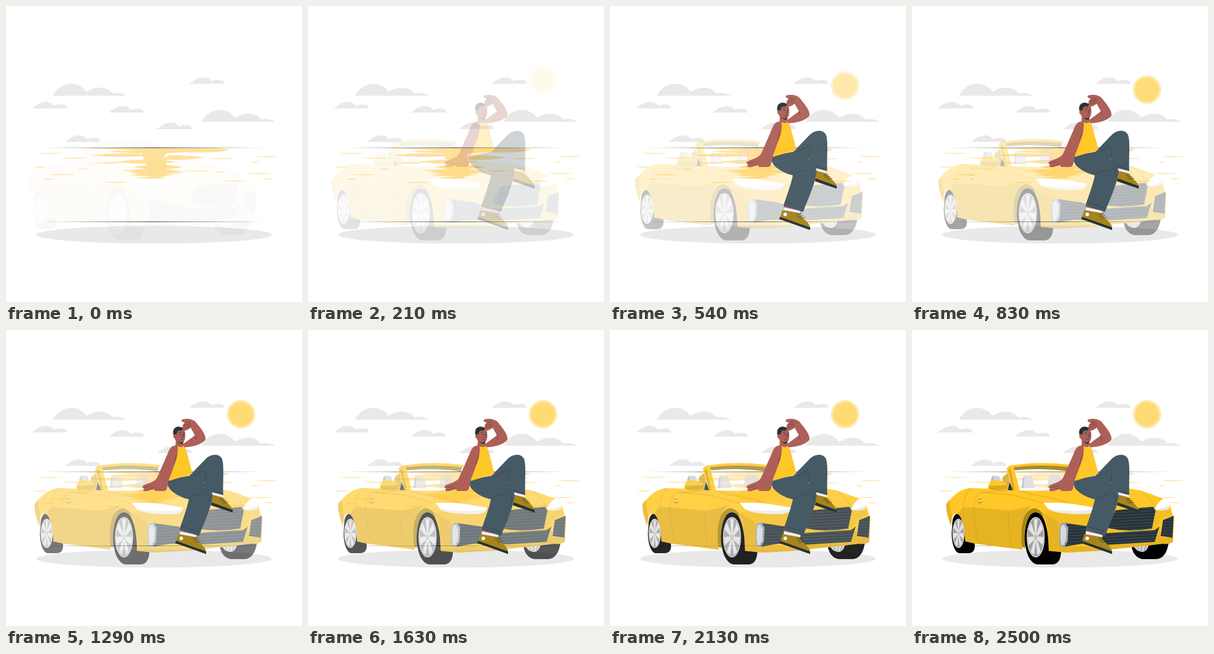
Recreate the animation shown at these times as an HTML page. Size 500x500 px, loop 2540 ms.

```html
<!DOCTYPE html>
<html lang="en">
<head>
<meta charset="utf-8">
<title>Sunset drive</title>
<style>
html, body { margin: 0; width: 100%; height: 100%; overflow: hidden; background: #fff; }
svg { display: block; width: 100vw; height: 100vh; }
.body { fill: #ffc727; }
.side { fill: #e6b323; }
.dark { fill: #263238; }
.skin { fill: #ae6058; }
.pants { fill: #455a64; }
.shoe { fill: #a6851a; }
.seam { fill: none; stroke: #263238; stroke-width: .7; stroke-linecap: round; stroke-linejoin: round; }
.crease { fill: none; stroke: #c99a18; stroke-width: .6; }
</style>
</head>
<body>
<svg viewBox="0 0 500 500">
<defs>
  <path id="big" d="M0 0C8-14 19-20 31-20C43-20 52-14 57-6.500C66-12 73-14 81-13.500C90-13 98-9 101-3.500C108-6 117-5 125 0Z"/>
  <path id="small" d="M0 0C9-8 17-11 23-11C30-11 35-8 37-4.500C43-7 50-7.500 54-6C58-5 59-3 58.500 0Z"/>
  <pattern id="mesh" width="6" height="5" patternUnits="userSpaceOnUse" patternTransform="rotate(-3)">
    <rect width="6" height="5" fill="#263238"/>
    <path d="M0 1H6" stroke="#52616a" stroke-width=".7"/>
  </pattern>
</defs>

<g id="clouds" fill="#e9e9e9"></g>
<g id="water" fill="#ffe09a"></g>
<g id="lines" fill="#37474f"></g>
<ellipse cx="250" cy="386.300" rx="199" ry="15" fill="#e9e9e9"/>

<g id="sun">
  <circle cx="397" cy="142.300" r="24" fill="#ffe9b0"/>
  <circle cx="397" cy="142.300" r="20.500" fill="#ffdb74"/>
</g>

<g id="car">
  <!-- cabin -->
  <g fill="#d3d3d3">
    <path d="M132 268L134 250Q136 246 141 246Q148 246 149 250L151 268Z"/>
    <path d="M185 267L187 250Q189 246 196 246Q203 246 204 250L208 267Z"/>
    <path d="M228 267L231 249Q233 245 241 245Q250 245 251 249L254 267Z"/>
  </g>
  <g fill="#b5b5b5">
    <path d="M132 268L134 250Q135 247 138 246Q136 256 137 268Z"/>
    <path d="M185 267L187 250Q188 247 191 246Q188 256 190 267Z"/>
  </g>
  <path d="M153 249L162 241L168 271H153Z" fill="#d9b344"/>
  <path class="dark" d="M162 271L165 257L171 271Z"/>
  <path d="M173 236Q220 229 264 238L255 270L181 269Z" fill="#fff" opacity=".3"/>
  <path d="M170 231Q218 224 268 231L265 239Q220 232 174 237Z" fill="#a58a31"/>
  <path class="body" d="M160 235Q161 230 166 229Q216 221 270 228L269 232Q217 226 172 232L182 271H170Z"/>
  <path d="M163 236L166 234L174 271H170Z" fill="#d8a71c"/>

  <!-- far wheel -->
  <path d="M370 357L434 350C434 371 426 387 412 387H390C378 386 370 374 370 357Z"/>
  <g id="rimC"></g>

  <!-- wheel wells and tyres -->
  <path d="M185 364C183 326 191 302 207 302C225 303 238 330 239 372Z" fill="#8c7220"/>
  <path d="M68 330C68 316 72 309 80 310C94 320 102 340 106 362C107 373 102 377 95 377H80C72 376 67 360 67 343Z"/>
  <path d="M190 346C190 322 197 308 208 308C224 309 240 340 252 370C252 386 248 396 236 396H212C199 395 190 374 190 346Z"/>

  <!-- shell -->
  <path class="body" d="M58 294C60 289 63 287 65 286C72 277 85 268 98 267L130 268L172 271L233 272C290 258 350 263 385 271C405 277 418 283 427 286C434 290 438 300 440 312L443 316L441 357C438 361 431 362 423 361L398 364L330 371L262 376L231 373C231 345 226 309 207 302C190 300 184 330 187 371L108 361L90 357C89 331 83 311 75 310C68 310 66 319 66 331C62 320 57 306 58 294Z"/>
  <path class="side" d="M86 299L105 300L165 305C177 303 188 300 202 297C188 306 184 338 187 371L108 361L90 357C89 333 85 317 78 310Z"/>
  <path class="side" d="M58 294L64 289C65 300 66 310 68 315L66 331C62 320 57 306 58 294Z"/>
  <path class="side" d="M222 309L248 324L250 366L291 365L334 372L262 376L231 373C231 348 228 322 222 309Z"/>
  <path class="side" d="M328 363L410 359L418 337L421 350L441 351L441 357C438 361 430 362 423 361L398 364L334 371Z"/>
  <path class="side" d="M309 301L348 303L408 298L411 303L434 303L440 312L422 318L410 338L331 342L293 333L248 324L222 309L232 306L285 312Z" opacity=".45"/>
  <path d="M186 366C182 326 190 302 207 301C216 303 222 310 224 316C214 304 204 307 199 314C192 325 189 343 191 369Z" fill="#a88719"/>
  <path class="crease" d="M98 267C91 277 87 288 87 299M104 303C103 292 107 281 116 274L160 272M104 303L110 358M162 305C163 326 165 350 168 367M116 274L172 279L222 293M182 272C202 278 235 283 265 292M385 271C398 281 408 290 411 303"/>
  <path d="M110 288Q112 284 117 285L121 288Q119 293 114 294Q110 293 110 288Z" fill="#d8a71c"/>
  <path d="M111 289L120 288" stroke="#ffe28e" stroke-width="2"/>
  <path class="body" d="M129 264C129 257 134 254 143 254C153 254 160 257 160 263C160 269 156 271 149 271C140 271 132 270 129 268Z"/>
  <path d="M129 264C139 262 150 263 160 262C160 269 156 271 149 271C140 271 132 270 129 268Z" fill="#dca91b"/>

  <!-- lights -->
  <path d="M222 292C242 290 274 293 309 300C309 307 302 311 287 311C264 311 239 309 230 302Z" fill="#fff"/>
  <path d="M230 302C250 306 280 307 308 303C306 309 299 311 287 311C264 311 239 309 230 302Z" fill="#ebebeb"/>
  <path d="M410 303C414 293 420 286 428 284C434 289 436 296 434 302C427 305 418 306 410 303Z" fill="#fff"/>
  <path d="M410 303Q423 302 434 298L434 302C427 305 418 306 410 303Z" fill="#e6e6e6"/>

  <!-- grilles -->
  <path d="M330 334L344 305L407 299L411 305L405 335Q366 342 330 334Z" fill="url(#mesh)"/>
  <path d="M330 334L344 305L407 299L411 305L405 335Q366 342 330 334Z" fill="none" stroke="#37474f"/>
  <path d="M258 326L300 332L330 343L410 338L418 332L410 358L328 363L288 361L258 366Z" fill="url(#mesh)"/>
  <path d="M424 321L442 314L440 351L420 348Z" fill="url(#mesh)"/>
  <path d="M250 327L259 325L264 334L263 357L258 366L250 366Q247 346 250 327Z" fill="#9da3a6"/>
  <path d="M252 330L257 329L261 337L260 355L255 364L252 363Q249 345 252 330Z" fill="#d7d9da"/>

  <g id="rimA"></g>
  <g id="rimB"></g>
</g>

<g id="man">
  <!-- far leg -->
  <path class="skin" d="M348 270L366 274L366 284L348 281Z"/>
  <path d="M347 273L367 278V283L347 278Z" fill="#f2f2f2"/>
  <path class="shoe" d="M349 279L366 283C371 291 382 297 383 305L347 293Z"/>
  <path class="dark" d="M347 291L383 304V308.500L346 296Z"/>
  <path class="seam" d="M361 286L369 285M363 289L372 288M366 292L375 291"/>
  <path class="pants" d="M311 245L338 217C348 208 361 209 365 218C369 230 366 255 367 279L336 271L336 257L319 266L302 254Z"/>
  <path class="seam" d="M336 257L338 237M337 268L366 276M316 247L334 237" opacity=".6"/>

  <!-- near leg -->
  <path class="skin" d="M294 337L323 342L322 351L293 346Z"/>
  <path d="M294 340L322 346L321 350L293 345Z" fill="#f2f2f2"/>
  <path class="shoe" d="M291 345L320 350C324 360 338 365 338 375L287 358Z"/>
  <path class="dark" d="M287 356L338 374V378.500L286 360Z"/>
  <circle cx="296" cy="352" r="3" fill="#fff"/>
  <path class="seam" d="M315 353L324 351M317 356L326 354M320 359L329 357"/>
  <path class="pants" d="M274 254C286 250 303 247 315 246C332 254 350 266 349 282C345 304 334 327 326 348L293 337C299 319 305 304 309 286C294 283 275 272 273 261Z"/>
  <path class="seam" d="M309 286C316 280 324 279 332 277M296 331L328 342M337 272Q346 278 344 291" opacity=".6"/>

  <!-- torso -->
  <path class="skin" d="M287 186L299 188L302 198L307 213L287 217L286 198Z"/>
  <path d="M290 196Q296 200 301 195C306 209 312 229 314.500 243L275 255C278 239 285 226 288 213Z" fill="#ffc727"/>
  <path class="skin" d="M301 198C313 198 331 194 337 185C338 176 328 165 321 156C316 150 305 149 298 151C295 153 297 156 302 156L299 160C298 163 297 167 299 171C304 170 309 168 312 165L319 178L300 192Z"/>
  <path class="seam" d="M302 156Q308 154 312 158M300 161Q306 157 312 161M300 166Q305 161 310 164M319 178Q322 182 321 185" opacity=".7"/>
  <path class="skin" d="M290 196C281 193 276 200 273 209L255 250C250 257 240 259 233 262C229 265 230 267 234 267C230 270 232 273 237 272L250 269L252 272H267C274 271 272 263 274 256L288 218Q291 204 290 196Z"/>
  <path class="seam" d="M233 267L245 263M237 272L248 266M288 211L283 228" opacity=".6"/>

  <!-- head -->
  <path class="skin" d="M284 171C286 164 299 161 302 171C304 179 303 190 296 191C289 192 285 186 284 180Z"/>
  <path class="dark" d="M286 182C281 178 281 168 286 165C290 162 296 163 299 166L297 170C291 168 288 171 288 178Z"/>
  <path class="dark" d="M289 187Q295 193 300 187L298 192Q293 193 289 187Z"/>
  <ellipse class="skin" cx="285.500" cy="179.500" rx="2.800" ry="3.600"/>
  <circle class="dark" cx="294.500" cy="176.500" r=".9"/>
  <circle class="dark" cx="300" cy="176.500" r=".9"/>
  <path class="seam" d="M292 173L296 172.500M299 173L301.500 174M298 177L299.500 181L297 181.500M295 185.500L299 185"/>
</g>
</svg>
<script>
const $ = id => document.getElementById(id);
const LOOP = 2540;

$('clouds').innerHTML =
  [[79, 151.5], [330, 195.5]].map(p => `<use href="#big" x="${p[0]}" y="${p[1]}"/>`).join('') +
  [[44, 173], [174, 180], [255, 208], [310, 131.5], [100, 229.5]]
    .map(p => `<use href="#small" x="${p[0]}" y="${p[1]}"/>`).join('');

// Spindle between x1 and x2, bulging up and down.
const lens = (x1, x2, y, up, down) => {
  const m = (x1 + x2) / 2;
  return `M${x1} ${y}Q${m} ${y - 2 * up} ${x2} ${y}Q${m} ${y + 2 * down} ${x1} ${y}Z`;
};
const star = (x, y, r) =>
  `<path fill="#fff" d="M${x} ${y - r}L${x + 1} ${y - 1}L${x + r} ${y}L${x + 1} ${y + 1}L${x} ${y + r}L${x - 1} ${y + 1}L${x - r} ${y}L${x - 1} ${y - 1}Z"/>`;

const glints = [[143, 252, 252, 3], [232, 336, 256, 4], [185, 290, 263, 3.5], [215, 299, 272, 4],
  [193, 300, 278, 2.5], [205, 302, 281, 3], [208, 286, 285, 2.5], [218, 272, 290, 1.5], [146, 200, 265, 1]];
const ripples = [[51, 97, 248.5], [91, 140, 256.5], [44, 70, 271.5], [119, 141, 275], [70, 117, 284.5],
  [63, 84, 292], [162, 208, 297.5], [300, 345, 278], [350, 373, 280], [340, 390, 257.5],
  [363, 412, 295.5], [405, 450, 282.5], [420, 462, 254], [433, 453, 291.5], [415, 428, 263]];

$('water').innerHTML = `<path d="M128 240H340Q368 240 377 243Q356 249 302 247L270 249L272 286L256 291L238 286L230 249Q190 248 172 245L224 244Q180 242 128 240Z"/>` +
  `<path d="${glints.map(g => lens(g[0], g[1], g[2], g[3], g[3])).join('')}"/>` +
  `<path d="${ripples.map(r => lens(...r, .2, 1.3)).join('')}"/>` +
  star(270, 254, 3.5) + star(236, 268, 2.5) + star(304, 266, 2.5);

$('lines').innerHTML = `<path d="${lens(62, 438, 239.5, .45, .45)}${lens(62, 438, 364.5, .45, .45)}"/>`;

function rim(id, cx, cy, rx, ry, gap) {
  let spokes = '';
  for (let i = 0; i < 7; i++) {
    const a = i * Math.PI * 2 / 7 - Math.PI / 2;
    const at = (d, r) => `${(cx + Math.cos(a + d) * rx * r).toFixed(1)} ${(cy + Math.sin(a + d) * ry * r).toFixed(1)}`;
    spokes += `M${at(-.5, .16)}L${at(-.23, .94)}L${at(.23, .94)}L${at(.5, .16)}Z`;
  }
  $(id).innerHTML = `<ellipse cx="${cx}" cy="${cy}" rx="${rx}" ry="${ry}" fill="${gap}" stroke="#d2d2d2" stroke-width="1.5"/>` +
    `<path d="${spokes}" fill="#e4e4e4"/><ellipse cx="${cx}" cy="${cy}" rx="${rx * .2}" ry="${ry * .16}" fill="#c4c4c4"/>`;
}
rim('rimA', 209, 350, 14.5, 33.5, '#a3a3a3');
rim('rimB', 78.5, 343.5, 9.5, 24, '#a3a3a3');
$('rimC').innerHTML = '<path d="M374 364L400 362Q398 374 389 375Q378 374 374 364Z" fill="#d5d5d5"/>' +
  '<path d="M380 365L385 374M388 364V374M396 363L392 373" stroke="#999" stroke-width="1.5"/>';

const clamp = x => Math.max(0, Math.min(1, x));
const ease = x => (1 - Math.cos(Math.PI * clamp(x))) / 2;

function pose(id, dx, dy, alpha) {
  $(id).setAttribute('transform', `translate(${dx.toFixed(2)} ${dy.toFixed(2)})`);
  $(id).setAttribute('opacity', alpha.toFixed(3));
}

function draw(t) {
  const drive = clamp(t / 2500);
  const rise = ease(t / 950);
  pose('car', -20 * (1 - drive), 0, clamp((t + 60) / 2560));
  pose('sun', 0, -20 * (1 - rise), rise);
  pose('man', 0, 0, ease(t < 80 ? 0 : t / 620));
}

let start;
function tick(now) {
  if (start === undefined) start = now;
  draw((now - start) % LOOP);
  requestAnimationFrame(tick);
}
draw(0);
requestAnimationFrame(tick);
</script>
</body>
</html>
```
